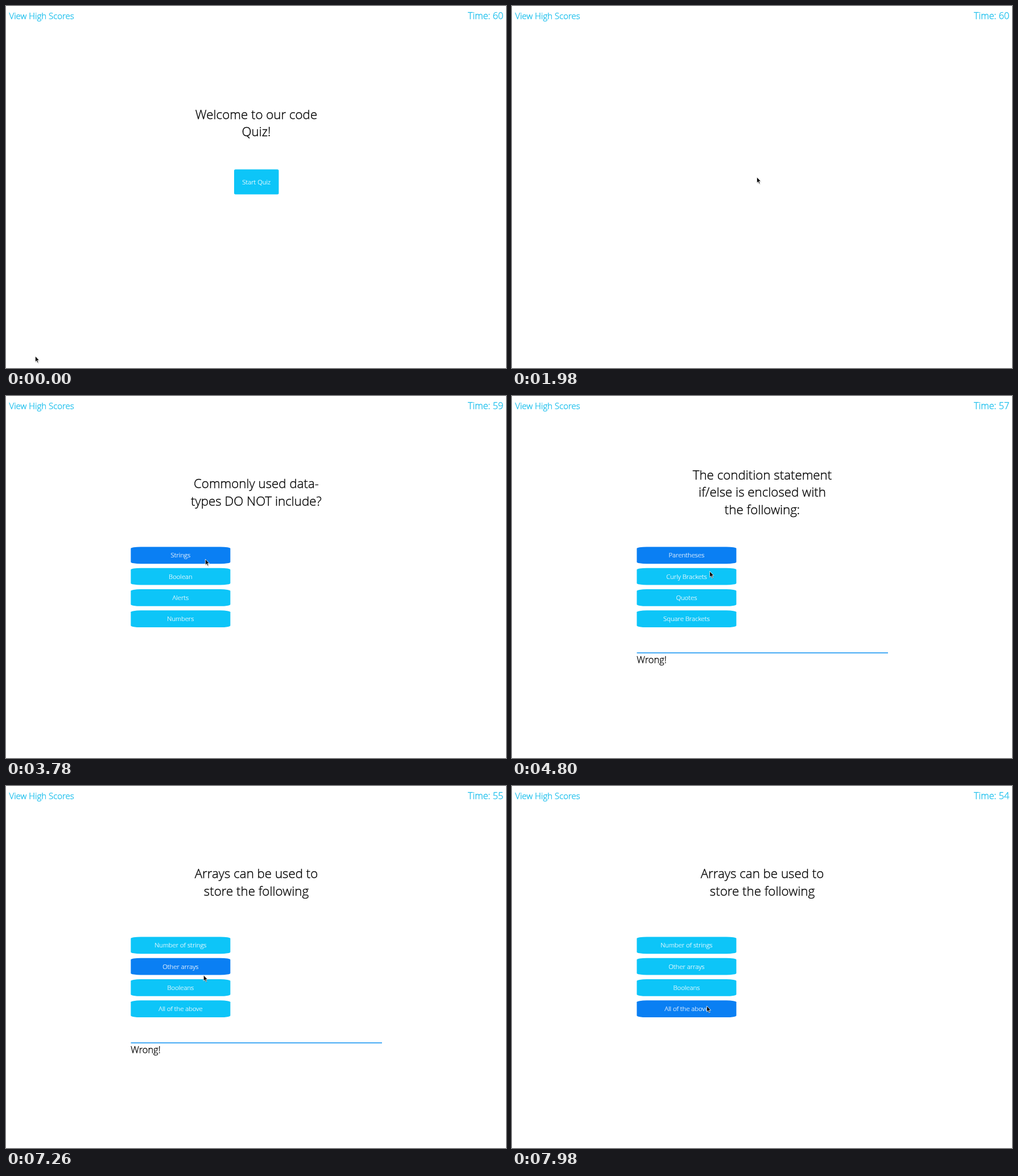
These frames come from a looping animation (879x637 px, 8000 ms). An HTML page:

```html
<!DOCTYPE html>
<html lang="en">
<head>
<meta charset="utf-8">
<title>Code quiz</title>
<style>
  html, body { margin: 0; width: 100%; height: 100%; overflow: hidden; background: #fff; }
  svg { display: block; width: 100%; height: 100%; }
  text {
    font-family: "Open Sans", "Noto Sans", sans-serif; font-weight: 300;
    color: #000; fill: currentColor; stroke: currentColor; stroke-width: .35px;
  }
  .head { color: #14bdec; }
  .title { font-size: 22.3px; text-anchor: middle; }
  .label { font-size: 11.25px; text-anchor: middle; color: #fff; stroke-width: .2px; }
</style>
</head>
<body>
<svg viewBox="0 0 879 637">
  <text class="head" x="5.5" y="22.8" font-size="15">View High Scores</text>
  <text class="head" id="time" x="874.3" y="22.6" font-size="16.3" text-anchor="end"></text>
  <g id="page"></g>
  <g id="result">
    <rect x="219.5" y="451.2" width="441.5" height="1.6" fill="#1c98f3"/>
    <text x="219.3" y="470.2" font-size="16.4">Wrong!</text>
  </g>
  <g id="cursor">
    <path d="M.6 1.4V12L3 9.9 4.7 13.6 6.6 12.8 5 9.3H8.2Z" opacity=".15"/>
    <path d="M0 0V10.3L2.4 8.2 4 11.9 5.7 11.2 4.1 7.6H7.2Z" stroke="#fff" stroke-width=".8"/>
  </g>
</svg>
<script>
const LOOP = 8000, STEP = 60;
const HOVER_LAG = 180, RESULT_LINGER = 420;
const $ = id => document.getElementById(id);

// Buttons: position, size and corner radii
const startButton = { x: 401, y: 287.5, w: 78.5, h: 44, rx: 2.5, ry: 2.5, label: "Start Quiz" };
const answerButtons = labels => labels.map((label, i) =>
  ({ x: 219.4, y: 265.4 + i * 37.3, w: 175, h: 29.8, rx: 17.5, ry: 3, label }));

// A wrong answer is given at `answered`
const pages = [
  { at: 0, y: 199, title: ["Welcome to our code", "Quiz!"], buttons: [startButton] },
  { at: 1980, y: 0, title: [], buttons: [] },
  {
    at: 2880, answered: 3840, y: 162.2,
    title: ["Commonly used data-", "types DO NOT include?"],
    buttons: answerButtons(["Strings", "Boolean", "Alerts", "Numbers"])
  },
  {
    at: 4680, answered: 5580, y: 147,
    title: ["The condition statement", "if/else is enclosed with", "the following:"],
    buttons: answerButtons(["Parentheses", "Curly Brackets", "Quotes", "Square Brackets"])
  },
  {
    at: 7200, y: 162.2,
    title: ["Arrays can be used to", "store the following"],
    buttons: answerButtons(["Number of strings", "Other arrays", "Booleans", "All of the above"])
  }
];

const moves = [
  { from: 0, to: 840, x: 374, y: 309 },
  { from: 840, to: 1200, x: 398, y: 328 },
  { from: 1320, to: 1740, x: 431, y: 301 },
  { from: 3240, to: 3600, x: 351, y: 287 },
  { from: 4240, to: 4440, x: 347, y: 292 },
  { from: 4600, to: 5160, x: 349, y: 320 },
  { from: 7180, to: 7980, x: 343, y: 387 }
];

const easeOut = k => 1 - (1 - k) ** 2;
const clamp = k => Math.min(1, Math.max(0, k));

function cursorAt(t) {
  let x = 52, y = 616;
  for (const m of moves) {
    const k = easeOut(clamp((t - m.from) / (m.to - m.from)));
    x += (m.x - x) * k;
    y += (m.y - y) * k;
  }
  return { x, y };
}

const contains = (b, p) => p.x >= b.x && p.x <= b.x + b.w && p.y >= b.y && p.y <= b.y + b.h;
const text = (cls, x, y, s) => `<text class="${cls}" x="${x}" y="${y}">${s}</text>`;
const drawButton = (b, hot) =>
  `<rect x="${b.x}" y="${b.y}" width="${b.w}" height="${b.h}" rx="${b.rx}" ry="${b.ry}" ` +
  `fill="${hot ? "#0a7ff3" : "#0dc5f8"}"/>` +
  text("label", b.x + b.w / 2, b.y + b.h / 2 + 4.1, b.label);

const drawPage = (page, pointer) =>
  page.title.map((s, i) => text("title", 440, page.y + i * 30.3, s)).join("") +
  page.buttons.map(b => drawButton(b, contains(b, pointer))).join("");

const resultShown = t => pages.some((p, i) =>
  t >= p.answered && t < pages[i + 1].at + RESULT_LINGER);

const secondsLeft = t => 60 - Math.max(0, Math.floor((t - 1965) / 912));

let markup;
function render(ms) {
  const t = Math.floor(ms % LOOP / STEP) * STEP;
  const page = pages.filter(p => p.at <= t).pop();
  const next = drawPage(page, cursorAt(t - HOVER_LAG));
  if (next !== markup) $("page").innerHTML = markup = next;
  $("time").textContent = "Time: " + secondsLeft(t);
  $("result").style.display = resultShown(t) ? "" : "none";
  const { x, y } = cursorAt(t);
  $("cursor").setAttribute("transform", `translate(${x - .6} ${y})`);
}

const begin = performance.now();
function frame() {
  render(performance.now() - begin);
  requestAnimationFrame(frame);
}
frame();
</script>
</body>
</html>
```
